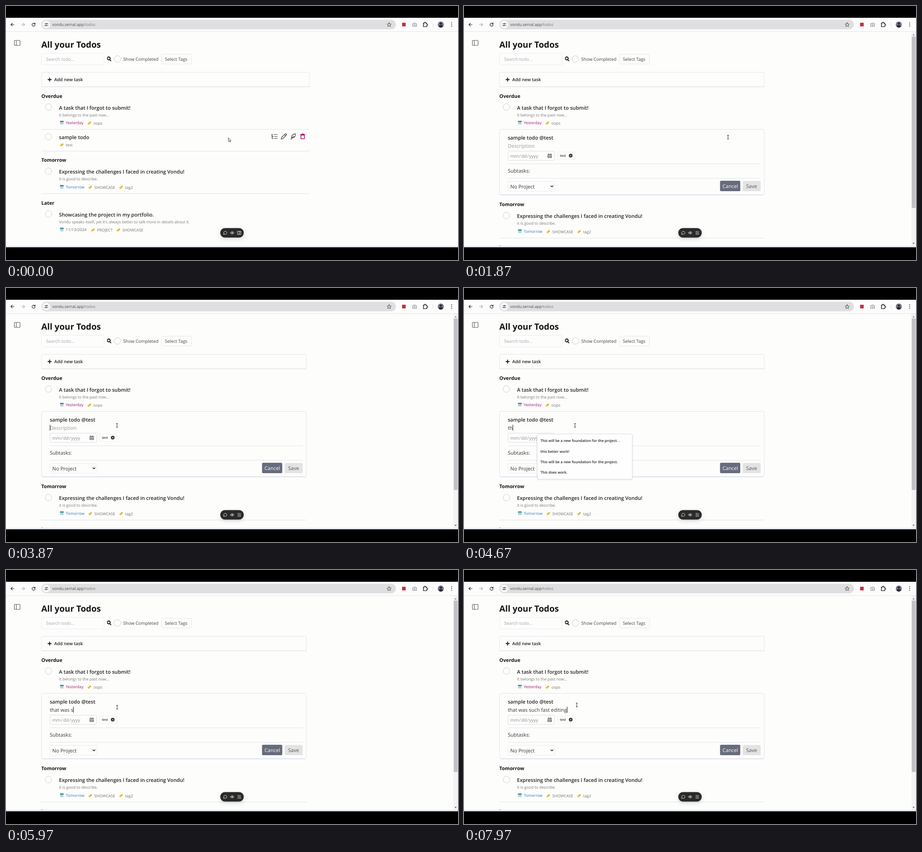
An HTML page that plays this animation: 998x561 px, repeating every 8 s.

```html
<!DOCTYPE html>
<html lang="en">
<head>
<meta charset="utf-8">
<title>Todo editing</title>
<style>
  html, body { margin: 0; width: 100%; height: 100%; overflow: hidden; background: #000; }
  svg { display: block; width: 998px; height: 561px; font-family: "Open Sans", "Noto Sans", sans-serif; }
  text { white-space: pre; text-rendering: geometricPrecision; fill: #222; }
  .title { font-size: 18.8px; font-weight: 700; fill: #151515; }
  .head { font-size: 10.85px; font-weight: 700; fill: #151515; }
  .task { font-size: 11.15px; font-weight: 600; }
  .field { font-size: 11.05px; fill: #333; }
  .control { font-size: 9.85px; fill: #444; }
  .add { font-size: 9.8px; font-weight: 600; }
  .small { font-size: 8.65px; fill: #777; }
  .url { font-size: 8.55px; fill: #444; }
  .chip { font-size: 7.2px; font-weight: 600; fill: #333; }
  .option { font-size: 7.95px; font-weight: 600; fill: #222; }
  .line { fill: none; stroke: #222; stroke-width: 1.2; stroke-linecap: round; stroke-linejoin: round; }
</style>
</head>
<body>
<svg id="stage" viewBox="0 0 998 561"></svg>
<script>
const PAGE = '#fdfdfc', BORDER = '#e6e6ec';
const LOOP = 8000, OPEN_AT = 1100, FOCUS_AT = 3400;
const MESSAGE = 'that was such fast editing';

const text = (x, y, cls, label, fill) =>
  `<text x="${x}" y="${y}" class="${cls}"${fill ? ` style="fill:${fill}"` : ''}>${label}</text>`;
const box = (x, y, w, h, r, fill, stroke = 'none') =>
  `<rect x="${x}" y="${y}" width="${w}" height="${h}" rx="${r}" fill="${fill}" stroke="${stroke}"/>`;
const line = (d, color = '#222', width = 1.2) =>
  `<path class="line" d="${d}" style="stroke:${color};stroke-width:${width}"/>`;
const shape = (d, fill) => `<path d="${d}" fill="${fill}"/>`;
const dot = (x, y, r, fill, stroke = 'none') =>
  `<circle cx="${x}" cy="${y}" r="${r}" fill="${fill}" stroke="${stroke}"/>`;
const at = (x, y, content) => `<g transform="translate(${x} ${y})">${content}</g>`;
const rule = (x1, x2, y, color = '#e2e2ea') => line(`M${x1} ${y}H${x2}`, color, 1);
const checkbox = (x, y) => dot(x, y, 7.3, PAGE, '#cdcddd');

const calendar = (x, y) => at(x, y,
  box(-4.2, -4, 8.4, 8.4, 1, '#d8e6ea') + box(-4.2, -4, 8.4, 2.8, 1, '#2a8a9c') +
  line('M-2.5 .6H2.5M-2.5 2.6H2.5', '#8fa9b3', .8));

const tag = (x, y) => `<g transform="translate(${x} ${y}) rotate(-38)">` +
  shape('M-4-2H2.6L4.6 0 2.6 2H-4Z', '#e8c33c') + dot(2.4, 0, .7, '#8d7420') + '</g>';

const meta = (y, date, color, tags) =>
  (date ? calendar(123.3, y - 3.6) + text(132, y, 'small', date, color) : '') +
  tags.map(([x, label]) => tag(x - 8.8, y - 2.6) + text(x, y + .7, 'small', label, '#707070')).join('');

const task = (y, title, note) =>
  checkbox(93.7, y - 5.4) + text(117, y, 'task', title) + (note ? text(117, y + 15, 'small', note) : '');

function browserBar() {
  return box(0, 26, 998, 30.5, 0, '#fcfcfc') + rule(0, 998, 56.5, '#e6e6e8') +
    line('M18 41H11M14 37.8 10.8 41 14 44.2') +
    line('M34 41H41M38 37.8 41.2 41 38 44.2', '#aaa') +
    line('M63.6 39.2A3.4 3.4 0 1 0 64.3 41.8M64.3 37.3V39.8H61.8') +
    box(78, 30.5, 783, 21, 10.5, '#dfdfe1') + dot(89, 41, 8.3, '#fbfbfb') +
    line('M85.5 39H88M91 39H93M85 43H87M90 43H93', '#333', 1.1) +
    dot(89.5, 39, 1.2, 'none', '#333') + dot(88.4, 43, 1.2, 'none', '#333') +
    text(102, 44.4, 'url', 'vondu.sernal.app<tspan fill="#777">/todos</tspan>') +
    line('M846 36.6 847.4 39.7 850.6 40 848.2 42.2 849 45.4 846 43.7 843 45.4 843.8 42.2 841.4 40 844.6 39.7Z', '#444', 1) +
    box(874.5, 37, 8, 8, 0, '#cf2a38') +
    line('M898 39H900L901 37.6H903.4L904.4 39H906.4V45H898Z', '#888') + dot(902.2, 42, 1.4, 'none', '#888') +
    line('M921.5 37.8H924V37A1.3 1.3 0 0 1 926.6 37V37.8H929V40.4H929.8A1.3 1.3 0 0 1 929.8 43H929V45.6H921.5V43A1.5 1.5 0 0 0 921.5 40.2Z', '#222', 1.4) +
    line('M943 37V45', '#ddd', 1) + dot(960, 41, 6.7, '#77727f') +
    dot(960, 38.8, 2.4, '#292633') + shape('M955.2 45.6C956 40.8 964 40.8 964.8 45.6A6.7 6.7 0 0 1 955.2 45.6Z', '#292633') +
    [37.2, 41, 44.8].map(y => dot(984, y, 1, '#333')).join('');
}

function pageHeader(right) {
  return line('M19.5 76H30Q31 76 31 77V86Q31 87 30 87H19.5Q18.5 87 18.5 86V77Q18.5 76 19.5 76ZM22.8 76V87', '#555', 1.1) +
    text(78, 92, 'title', 'All your Todos') +
    box(78.5, 104.5, 138, 25.5, 2, PAGE, '#ececf2') + text(88.5, 121, 'control', 'Search todo...', '#a5a5b4') +
    dot(226.6, 116, 3.2, 'none', '#111') + line('M229.2 118.8 231.6 121.2M224.2 114A3.2 3.2 0 1 1 224 117', '#111', 1.8) +
    checkbox(246, 117) + text(258.7, 121, 'control', 'Show Completed') +
    box(343.5, 106.5, 66, 21.5, 2, PAGE, BORDER) + text(350.7, 121, 'control', 'Select Tags') +
    box(78.5, 146.5, right - 78.5, 32, 2, PAGE, BORDER) + rule(79, right, 178.5, '#d8d8de') +
    line('M92.8 162.5H99.8M96.3 159V166', '#111', 1.8) + text(106.5, 166.2, 'add', 'Add new task');
}

function overdueTask() {
  return text(78, 202.6, 'head', 'Overdue') +
    task(228.5, 'A task that I forgot to submit!', 'It belongs to the past now...') +
    meta(261.3, 'Yesterday', '#9c1672', [[193, 'oops']]);
}

function laterTasks(right) {
  return text(78, 344.4, 'head', 'Tomorrow') +
    task(370.4, 'Expressing the challenges I faced in creating Vondu!', 'it is good to describe.') +
    meta(403, 'Tomorrow', '#2679b4', [[195, 'SHOWCASE'], [263, 'tag2']]) +
    rule(78, right, 414.5) +
    text(78, 438.8, 'head', 'Later') +
    task(464.8, 'Showcasing the project in my portfolio.',
      "Vondu speaks itself, yet it's always better to talk more in details about it.") +
    meta(497.3, '11/13/2024', '#666', [[201, 'PROJECT'], [257, 'SHOWCASE']]);
}

function sampleRow(right) {
  return rule(78, right, 272.5) + task(294, 'sample todo') + meta(309.3, '', '', [[132, 'test']]) +
    rule(78, right, 320.5) +
    line('M586 284H589M587.5 284V292.5H590.5M587.5 288.5H590.5M592 284H599M593 288.5H599M593 292.5H599', '#333') +
    line('M607.5 294 608.5 290.2 616.5 282.4Q618 281.6 619.2 283 620.2 284.2 619.2 285.2L611.2 293ZM615 284 617.7 286.7', '#333') +
    line('M628.8 294.8 633.8 288.3M630.5 292.2C629.5 286.5 633 282.8 639 282.2 639.3 286 637.5 290.5 630.5 292.2M635 289.2H638', '#333') +
    line('M651.2 285.2H658.8V293.2H651.2ZM650 283.8H660M653.5 282.6H656.5', '#b0186c', 1.6);
}

function editCard() {
  return box(78.5, 272.5, 584.5, 144.5, 4, PAGE, '#e2e2ea') + rule(80, 661, 417, '#d4d2ec') +
    text(96.7, 294.6, 'task', 'sample todo @test') +
    text(96.7, 312.6, 'field', 'Description', '#999').replace('<text', '<text id="placeholder"') +
    text(96.7, 312.6, 'field', '').replace('<text', '<text id="typed"') +
    '<rect id="caret" y="302" width="1" height="13" fill="#111"/>' +
    box(97, 320.5, 103, 20.5, 3, PAGE, '#dedee4') +
    text(102.3, 334.6, 'control', 'mm\u200a/\u200add\u200a/\u200ayyyy', '#8a8a8a') +
    box(184.5, 327, 9.5, 8.5, 1.2, '#777') + rule(185, 193.5, 329.8, '#eee') +
    line('M187 325.8V327.5M191.5 325.8V327.5', '#777') +
    line('M186.5 331.7H192M186.5 333.6H192', '#ddd', .8) +
    box(206.5, 322.5, 39, 16.5, 2, PAGE, '#eeeef2') + text(211.8, 333.2, 'chip', 'test') +
    dot(235.6, 330.6, 4, '#292929') + line('M234.3 329.3 236.9 331.9M236.9 329.3 234.3 331.9', '#fff', 1) +
    rule(97, 655, 348.5, '#e4e4f0') + text(96.7, 367.8, 'field', 'Subtasks:') + rule(97, 655, 380.5, '#e4e4ea') +
    box(97, 387.5, 103, 21.5, 2, PAGE, '#ececf2') + text(102.3, 402.5, 'field', 'No Project') +
    line('M191.8 397 194.2 399.5 196.6 397', '#222', 1.5) +
    box(565.3, 386, 44.7, 23, 2.5, '#676c7d') + text(570.8, 402.3, 'field', 'Cancel', '#fff') +
    box(615.5, 386.5, 39.5, 22.5, 2.5, '#e3e3e3') + text(623, 402.3, 'field', 'Save', '#555');
}

const scrollbar = () =>
  box(988, 57, 10, 473, 0, '#f3f3f4') + box(988.7, 67.5, 8.3, 378.5, 0, '#c0c0c6') +
  shape('M990.3 65 992.7 62 995.1 65Z', '#888') + shape('M990.3 523 992.7 526 995.1 523Z', '#666');

function suggestions() {
  const options = ['This will be a new foundation for the project. .', 'this better work!',
    'This will be a new foundation for the project.', 'This does work.'];
  return `<g filter="url(#soft)">${box(161.5, 322.5, 210, 99.5, 3, '#fefefe', '#e0dee8')}</g>` +
    options.map((label, i) => text(168.8, 340.2 + i * 23.4, 'option', label)).join('');
}

const floatingBar = () =>
  `<g filter="url(#shadow)">${box(473, 490.5, 52, 21, 10.5, '#29292b')}</g>` +
  line('M480.5 504.3 481 502.4A3.6 3.3 0 1 1 482.8 504Z', '#ddd', 1) +
  line('M495.3 501Q499.5 495.8 503.7 501 499.5 506.2 495.3 501Z', '#ddd', 1) + dot(499.5, 501, 1.4, '#ddd') +
  `<g id="panelIcon">${line('M511.5 497.5H518.7V504.5H511.5ZM515.1 497.5V504.5M516.7 499.7H517.2', '#ddd', 1)}</g>` +
  `<g id="listIcon">${line('M511.7 498H516M511.7 501H518.5M511.7 504H518.5', '#ddd', 1.1)}${dot(518, 498, .9, '#5aa2f0')}</g>`;

document.getElementById('stage').innerHTML = `
  <defs>
    <filter id="soft" x="-10%" y="-10%" width="120%" height="125%">
      <feDropShadow dx="0" dy="1" stdDeviation="1.5" flood-opacity=".14"/></filter>
    <filter id="shadow" x="-40%" y="-60%" width="180%" height="260%">
      <feDropShadow dx="0" dy="3" stdDeviation="5" flood-opacity=".14"/></filter>
    <clipPath id="window"><rect y="26" width="998" height="504"/></clipPath>
  </defs>
  ${box(0, 0, 998, 561, 0, '#000')}${box(0, 26, 998, 507, 0, PAGE)}
  <g clip-path="url(#window)">
    <g id="listView">${pageHeader(670)}${overdueTask()}${sampleRow(670)}${laterTasks(670)}</g>
    <g id="editView">${pageHeader(663)}${overdueTask()}${editCard()}${at(0, 98, laterTasks(663))}${scrollbar()}
      <g id="popup">${suggestions()}</g></g>
    ${floatingBar()}
  </g>
  ${browserBar()}
  ${box(0, 530, 998, 3, 0, '#dde4ea')}
  <g id="pointer">
    <path id="arrow" d="M0 0V8.4L2 6.7 3.4 9.6 4.9 8.9 3.5 6.1H6Z" fill="#fff" stroke="#333" stroke-width=".9"/>
    <g id="beam">${line('M-1.7-4H1.7M0-4V4M-1.7 4H1.7', '#333', 1)}</g>
  </g>`;

const el = Object.fromEntries([...document.querySelectorAll('#stage [id]')].map(node => [node.id, node]));
const show = (node, visible) => node.setAttribute('visibility', visible ? 'inherit' : 'hidden');
const ease = p => p * p * (3 - 2 * p);

// Keys are [time, ...values].
const POINTER = [[0, 491, 291], [250, 491, 291], [800, 612, 288], [1150, 612, 288], [1650, 583, 289.7],
  [2100, 583, 289.7], [2850, 259, 291.7], [3050, 259, 291.7], [3320, 245, 303.5], [5900, 245, 303.5], [6300, 249, 298]];
const TYPING = [[4150, 0], [4600, 2.2], [4720, 2.9], [5230, 7.1], [5400, 7.9], [6750, 15.1], [7900, 26]];

function sample(keys, t, curve = p => p) {
  const next = keys.findIndex(key => key[0] > t);
  if (next === 0) return keys[0].slice(1);
  if (next < 0) return keys.at(-1).slice(1);
  const from = keys[next - 1], to = keys[next];
  const p = curve((t - from[0]) / (to[0] - from[0]));
  return from.slice(1).map((value, i) => value + (to[i + 1] - value) * p);
}

function draw(now) {
  const t = now % LOOP, editing = t >= OPEN_AT;
  const count = Math.floor(sample(TYPING, t)[0]);
  const [x, y] = sample(POINTER, t, ease);

  show(el.listView, !editing);
  show(el.editView, editing);
  show(el.panelIcon, !editing);
  show(el.listIcon, editing);
  show(el.arrow, !editing);
  show(el.beam, editing);
  el.pointer.setAttribute('transform', `translate(${x} ${y})`);

  el.typed.textContent = MESSAGE.slice(0, count);
  show(el.placeholder, editing && !count);
  show(el.popup, editing && count > 0 && count < 3);
  const caretOn = count > 0 || (t >= FOCUS_AT && (t - FOCUS_AT) % 1000 < 500);
  show(el.caret, editing && caretOn);
  el.caret.setAttribute('x', 96.7 + (count ? el.typed.getComputedTextLength() : 0));

  requestAnimationFrame(draw);
}
requestAnimationFrame(draw);
</script>
</body>
</html>
```
